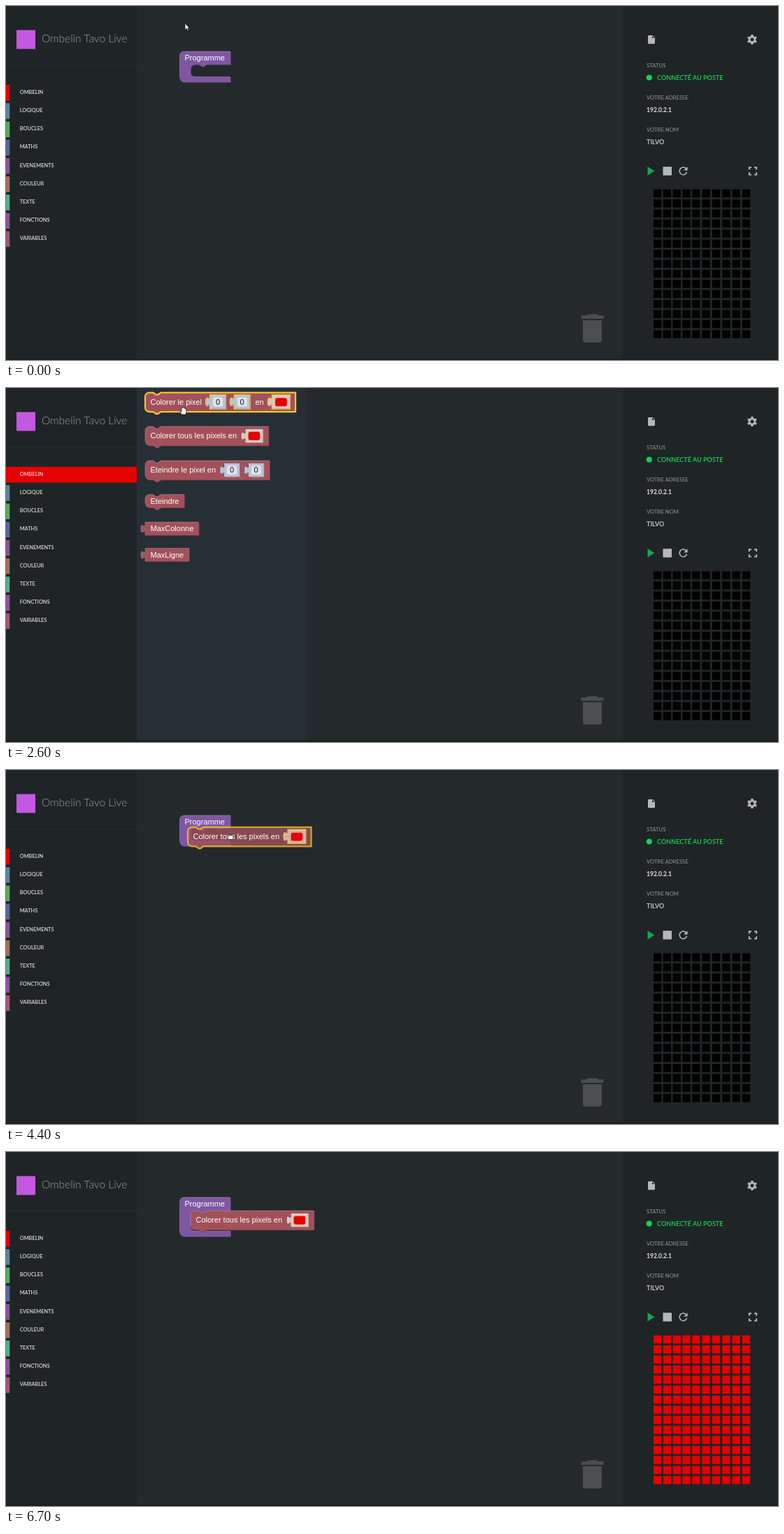
Write an HTML page that moves like this. It is 1104x507 px and loops after 7200 ms.

```html
<!DOCTYPE html>
<html lang="fr">
<head>
<meta charset="utf-8">
<title>Blocs</title>
<style>
html, body { margin: 0; width: 100%; height: 100%; overflow: hidden; background: #1f2526; }
svg { display: block; width: 100%; height: 100%; }
.ui { font-family: Lato, "Open Sans", sans-serif; }
.code { font: 11px "Liberation Sans", Arial, sans-serif; fill: #fff; }
.dragging path { opacity: .8; }
.dragging .edge { display: none; }
</style>
</head>
<body>
<svg id="stage" viewBox="0 0 1104 507"></svg>
<script>
const LOOP = 7200, STEP = 100;
const RED = '#e60000', ICON = '#b5b8b8', GOLD = '#f5c431';

// [fill, shaded edge]
const COLORS = {
  red: ['#a2515b', '#7d404a'],
  purple: ['#7f57a1', '#664681'],
  number: ['#bac2d7', '#8f95a8'],
  colour: ['#d9c8be', '#a79a93'],
};

const MENU = [
  ['OMBELIN', RED], ['LOGIQUE', '#5a84a1'], ['BOUCLES', '#55ab5c'],
  ['MATHS', '#5865a2'], ['EVENEMENTS', '#8b519c'], ['COULEUR', '#a36e59'],
  ['TEXTE', '#56ad8a'], ['FONCTIONS', '#9050a2'], ['VARIABLES', '#a1537b'],
];

const PAINT_ALL = {
  x: 199, y: 55, w: 176.5, h: 27.5,
  labels: [[7.5, 'Colorer tous les pixels en']], inputs: [[143.5, 'colour']],
};
const FLYOUT = [
  { x: 199, y: 6.5, w: 215, h: 27.5,
    labels: [[7.5, 'Colorer le pixel'], [157.5, 'en']],
    inputs: [[93.2, 'number'], [127.9, 'number'], [182, 'colour']] },
  PAINT_ALL,
  { x: 199, y: 104, w: 178, h: 27.5,
    labels: [[7.5, 'Eteindre le pixel en']], inputs: [[113.2, 'number'], [147.9, 'number']] },
  { x: 199, y: 152.5, w: 56, h: 18.75, labels: [[7.5, 'Eteindre']], inputs: [] },
  { x: 199, y: 192, w: 76.7, h: 18.75, labels: [[7.5, 'MaxColonne']], inputs: [], output: true },
  { x: 199, y: 229.5, w: 63, h: 18.75, labels: [[7.5, 'MaxLigne']], inputs: [], output: true },
];

// time, x, y, cursor shape from that moment on
const POINTER = [
  [0, 256, 25, 'arrow'], [200, 256, 25, ''], [700, 66, 75, 'arrow'], [800, 66, 75, 'arrow'],
  [1200, 40, 123, 'finger'], [1400, 41, 124, 'finger'], [1500, 130, 126, 'arrow'],
  [1600, 222, 127, 'open'], [1700, 242, 127, 'open'], [1800, 243, 123, 'open'],
  [2100, 252, 76, 'open'], [2500, 254, 36, 'open'], [2600, 254, 33, 'open'],
  [2700, 254, 33, 'open'], [3200, 267, 84, 'open'], [3500, 266, 92, 'open'],
  [3600, 270, 89, 'open'], [3700, 270, 89, 'open'], [3800, 288, 82, 'fist'],
  [3900, 305, 87, 'fist'], [4000, 305, 87, 'fist'], [4200, 321, 96, 'fist'],
  [4400, 321, 96, 'fist'], [4500, 345, 112, 'arrow'], [4900, 855, 253, 'arrow'],
  [5000, 855, 253, 'arrow'], [5400, 922, 242, 'finger'], [5500, 923, 244, 'finger'],
  [5800, 923, 244, 'finger'], [5900, 880, 235, 'arrow'], [6400, 450, 164, 'arrow'],
  [6500, 450, 164, 'arrow'], [6600, 149, 10, 'arrow'], [6700, 149, 10, ''],
];
const DRAG = [
  [3500, 199, 55], [3700, 199, 55], [3800, 222, 63], [3900, 243, 72],
  [4000, 243, 72], [4200, 260, 81.8], [4500, 260, 81.8],
];

const CURSORS = {
  arrow: 'M0 0V9.2L2.2 7.2L3.7 10.6L5.2 10L3.7 6.7H6.6Z',
  open: 'M-3 5L-5 1Q-5.4-.6-4-.2L-3 1V-4Q-2.2-5.2-1.5-4V-5Q-.6-6 .2-5V-4.4Q1.2-5.4 2-4.2V-3Q3.4-3.8 3.8-2.4V2L2.6 5Z',
  fist: 'M-2.5 3.5L-4 1Q-4-.5-3-.5V-2Q-2-3-1-2.2Q0-3.2 1-2.2Q2-3 2.8-1.8Q4-1.8 4 0V1.5L3 3.5Z',
  finger: 'M-2.5 5L-5 1.5Q-5 0-3.5.8L-2.8 1.4V-4Q-2-5.4-1.2-4V-1Q4-1 4.2.5V2.5L3 5Z',
};

const rect = (x, y, w, h, fill, extra = '') =>
  `<rect x="${x}" y="${y}" width="${w}" height="${h}" fill="${fill}" ${extra}/>`;
const path = (d, attrs) => `<path d="${d}" ${attrs}/>`;
const text = (x, y, size, fill, label, weight = 500) =>
  `<text class="ui" x="${x}" y="${y}" font-size="${size}" fill="${fill}" font-weight="${weight}">${label}</text>`;
const move = (x, y, body, attrs = '') => `<g transform="translate(${x} ${y})" ${attrs}>${body}</g>`;

function sample(keys, t) {
  let i = keys.length - 1;
  while (i && keys[i][0] > t) i--;
  const a = keys[i], b = keys[i + 1] || a;
  const k = b === a ? 0 : (t - a[0]) / (b[0] - a[0]);
  return { x: a[1] + (b[1] - a[1]) * k, y: a[2] + (b[2] - a[2]) * k, shape: a[3] };
}

// Block outlines
const TAB = 'V15c0-7.5-6 6-6-5.6s6 1.9 6-5.6';
const outputShape = (w, h) => `M0 0H${w}V${h}H0${TAB}Z`;
const stackShape = (w, h) =>
  `M0 6A6 6 0 0 1 6 0H11.25l4.5 3h2.25l4.5-3H${w}V${h}H22.5l-4.5 3h-2.25l-4.5-3H6a6 6 0 0 1-6-6Z`;
const programShape = inner =>
  `M0 6A6 6 0 0 1 6 0H72.5V18.75H38l-4.5 3h-2.25l-4.5-3H21.5a6 6 0 0 0-6 6V${12.75 + inner}` +
  `a6 6 0 0 0 6 6H72.5v7.5H6a6 6 0 0 1-6-6Z`;

function body(shape, color, rim, selected) {
  const [fill, edge] = COLORS[color];
  return path(shape, `class="edge" fill="${edge}" transform="translate(.75 .75)"`) +
    path(shape, `fill="${fill}"` + (selected ? ` stroke="${GOLD}" stroke-width="2.25"` : '')) +
    (selected ? '' : path(rim, 'fill="none" stroke="#fff" stroke-opacity=".32" stroke-width=".75"'));
}

function inputBlock(x, kind, selected) {
  const isNumber = kind === 'number', w = isNumber ? 21.6 : 24.7;
  const shape = outputShape(w, 19);
  const hole = path(shape, `fill="none" stroke="${selected ? GOLD : '#743943'}" stroke-width="${selected ? 2.6 : 1}"`);
  const field = isNumber
    ? rect(3.75, 3, 14.1, 13, '#fff', 'fill-opacity=".55" rx="3"') +
      '<text class="code" x="7.7" y="13.4" style="fill:#111">0</text>'
    : rect(3.75, 3.6, 17.2, 12.4, RED, 'rx="3" stroke="#fff" stroke-opacity=".5" stroke-width=".6"');
  return move(x, 4, hole + body(shape, kind, `M0 19V15M0 0H${w}`) + field);
}

function block(spec, { x = spec.x, y = spec.y, selected = false, dragging = false } = {}) {
  const { w, h, output } = spec;
  const shape = (output ? outputShape : stackShape)(w, h);
  const rim = output ? `M0 ${h}${TAB}V0H${w}` : `M0 ${h - 6}V6A6 6 0 0 1 6 0H11.25l4.5 3h2.25l4.5-3H${w}`;
  const baseline = h > 20 ? 17.2 : 13.4;
  const labels = spec.labels.map(([lx, s]) => `<text class="code" x="${lx}" y="${baseline}">${s}</text>`);
  const inputs = spec.inputs.map(([ix, kind]) => inputBlock(ix, kind, selected));
  return move(x, y, body(shape, 'red', rim, selected) + inputs.join('') + labels.join(''),
    dragging ? 'class="dragging"' : '');
}

function program(filled) {
  const inner = filled ? 29.75 : 17.75;
  const rim = `M0 ${inner + 20}V6A6 6 0 0 1 6 0H72.5M17.3 ${inner + 17}A6 6 0 0 0 21.5 ${inner + 18.75}H72.5`;
  return move(248.5, 65, body(programShape(inner), 'purple', rim) +
    '<text class="code" x="7" y="13.2">Programme</text>');
}

// Fixed interface
function icons() {
  const tooth = a => rect(-1.7, -7, 3.4, 4, ICON, `rx=".5" transform="rotate(${a})"`);
  const gear = [0, 60, 120, 180, 240, 300].map(tooth).join('') +
    `<circle r="3.9" fill="none" stroke="${ICON}" stroke-width="2.8"/>`;
  const reload = 'M17.65 6.35C16.2 4.9 14.2 4 12 4a8 8 0 1 0 7.73 10h-2.08A6 6 0 1 1 16.22 7.78L13 11h7V4Z';
  return path('M919.2 42H924.6L928 45.4V53Q928 54.3 926.8 54.3H919.2Q918 54.3 918 53V43.2Q918 42 919.2 42Z', `fill="${ICON}"`) +
    path('M924 42.9V46.1H927.2Z', 'fill="#1f2526"') +
    move(1067, 48.1, gear) +
    path('M917.5 230V242.7L927.2 236.3Z', 'fill="#1fa34b"') +
    rect(939.5, 230.2, 12.5, 12.4, ICON) +
    path(reload, `fill="${ICON}" transform="translate(959.4 227.2) scale(.76)"`) +
    path('M1066 231.2H1062.8V234.5M1070 231.2H1073.2V234.5M1066 241.6H1062.8V238.3M1070 241.6H1073.2V238.3',
      `fill="none" stroke="${ICON}" stroke-width="1.9"`);
}

function backdrop() {
  return rect(0, 0, 1104, 507, '#1f2526') + rect(187, 0, 695, 505, '#24292b') +
    rect(0, 84.5, 187, 1, '#293032') + rect(0, 505, 1104, 2, '#1b1e1f') +
    path('M822.5 443.3H830.5L832.5 441.2H844.5L846.5 443.3H854.5V447.9H822.5ZM825 450.1H852V478.5Q852 481.9 848.6 481.9H828.4Q825 481.9 825 478.5Z', 'fill="#4a4e50"') +
    rect(15, 34.5, 27, 27, '#c558e0') +
    text(51, 52.3, 15.5, '#999e9f', 'Ombelin Tavo Live', 300) +
    text(916, 87.8, 7.7, '#8b9091', 'STATUS') +
    '<circle cx="919.8" cy="102.6" r="4" fill="#17d256"/>' +
    text(931, 106.2, 9.1, '#17d256', 'CONNECTÉ AU POSTE', 600) +
    text(916, 134, 7.7, '#8b9091', 'VOTRE ADRESSE') +
    text(916, 152.4, 8.6, '#dddfdc', '192.0.2.1', 700) +
    text(916, 179.6, 7.7, '#8b9091', 'VOTRE NOM') +
    text(916, 198, 9.1, '#d8d6c8', 'TILVO', 600) + icons();
}

function menu(open, hovered) {
  return MENU.map(([label, color], i) => {
    const y = 113 + 26.2 * i;
    const w = i ? 5.25 : open ? 187 : hovered ? 8 : 5.25;
    return rect(0, y, w, 22.5, color) + text(19.7, y + 12.7, 7.4, '#d9dbd8', label, 600);
  }).join('');
}

// The right half of the columns is spaced a little wider than the left.
const columnX = col => 926 + 13.8 * col + 0.55 * Math.max(0, col - 4);

function matrix(lit) {
  let cells = '';
  for (let row = 0; row < 15; row++)
    for (let col = 0; col < 10; col++)
      cells += rect(columnX(col), 262.6 + 14.4 * row, 11.3, 11.5, lit ? RED : '#000');
  return cells;
}

function scene(t) {
  const pointer = sample(POINTER, t);
  const open = t >= 1400 && t < 3500, dropped = t >= 4500;
  const hit = b => pointer.x > b.x && pointer.x < b.x + b.w && pointer.y > b.y && pointer.y < b.y + b.h + 3;
  let out = menu(open, t >= 1100 && t < 1400) + matrix(t >= 5600);
  if (open) {
    out += rect(187, 0, 241, 505, '#262f35') +
      FLYOUT.map(b => block(b, { selected: hit(b) })).join('');
  } else {
    out += program(dropped);
    if (dropped) out += block(PAINT_ALL, { x: 264, y: 84, selected: t < 4900 });
    else if (t >= 3500) {
      const dragging = t >= 3800;
      out += block(PAINT_ALL, { ...sample(DRAG, t), selected: dragging, dragging });
    }
  }
  if (pointer.shape)
    out += move(pointer.x, pointer.y, path(CURSORS[pointer.shape], 'fill="#fff" stroke="#111" stroke-width=".7" stroke-linejoin="round"'));
  return out;
}

const stage = document.getElementById('stage');
stage.innerHTML = backdrop() + '<g id="live"></g>';
const live = document.getElementById('live');
const start = performance.now();
let shown = -1;

function draw() {
  const elapsed = Math.max(0, performance.now() - start) % LOOP;
  const t = Math.floor(elapsed / STEP) * STEP;
  if (t !== shown) live.innerHTML = scene(shown = t);
  requestAnimationFrame(draw);
}
draw();
</script>
</body>
</html>
```
